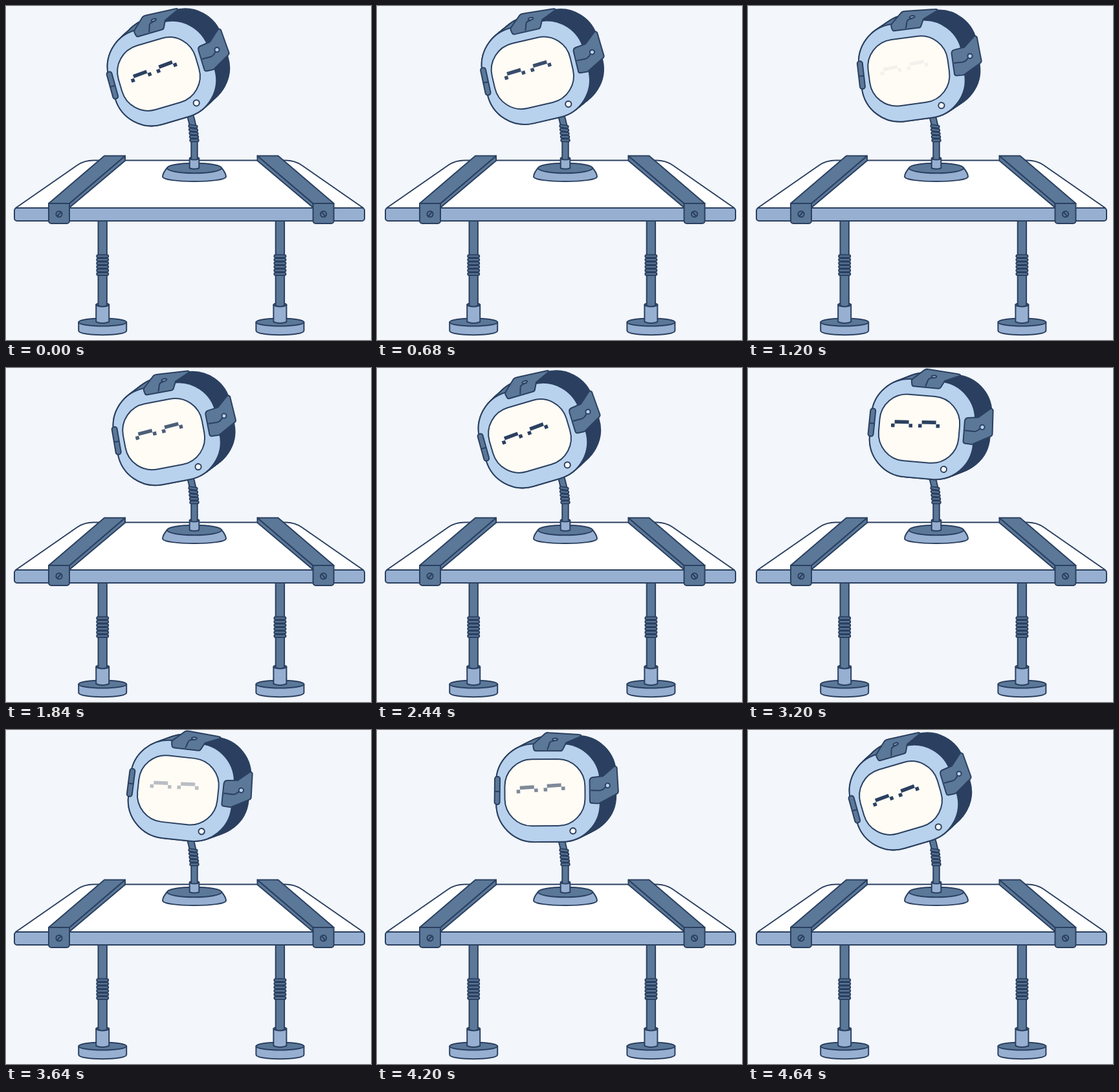
Animation of 564 by 516 pixels, one loop 4800 ms. Source, as an HTML page with a canvas:

```html
<!DOCTYPE html>
<html lang="en">
<head>
<meta charset="utf-8">
<title>Desk robot</title>
<style>
  html, body { margin: 0; width: 564px; height: 516px; overflow: hidden; background: #f3f6fb; }
  canvas { display: block; }
</style>
</head>
<body>
<canvas id="stage" width="564" height="516"></canvas>
<script>
const ctx = document.getElementById('stage').getContext('2d');
const LOOP = 4800, STEP = 40;
const BG = '#f3f6fb', LINE = '#2b4060', MID = '#5b7899', LIGHT = '#97b0d1',
      FACE = '#b8d2ee', GLASS = '#fffcf5', WHITE = '#ffffff';
const RAD = Math.PI / 180;

const clamp = v => Math.min(1, Math.max(0, v));
const ramp = (t, a, b) => clamp((t - a) / (b - a));
const ease = (t, a, b) => {
  const u = ramp(t, a, b);
  return u * u * u * (10 - 15 * u + 6 * u * u);
};

function paint(path, fill) {
  if (fill) { ctx.fillStyle = fill; ctx.fill(path); }
  ctx.lineWidth = 2;
  ctx.strokeStyle = LINE;
  ctx.stroke(path);
}
const draw = (d, fill) => paint(new Path2D(d), fill);

function box(x, y, w, h, r, fill) {
  const p = new Path2D();
  p.roundRect(x, y, w, h, r);
  paint(p, fill);
}

function oval(x, y, rx, ry, fill, tilt = 0) {
  const p = new Path2D();
  p.ellipse(x, y, rx, ry, tilt * RAD, 0, 7);
  paint(p, fill);
}

function at(x, y, deg, fn) {
  ctx.save();
  ctx.translate(x, y);
  ctx.rotate(deg * RAD);
  fn();
  ctx.restore();
}

function strap() {
  draw('M184 231.5V239L98 311.5V305Z', MID);
  draw('M66 305L152 231.5H184L98 305Z', MID);
  box(66, 305, 32, 31, [0, 0, 4, 4], MID);
  oval(82, 321.5, 4.6, 4.6, MID);
  draw('M79 325L85 318');
}

function leg(x) {
  at(x, 0, 0, () => {
    draw('M-37 488.5V501.5C-37 510.5 37 510.5 37 501.5V488.5Z', LIGHT);
    oval(0, 488.5, 37, 6, MID);
    draw('M-10 461.5V488Q0 492 10 488V461.5Z', LIGHT);
    oval(0, 461.5, 10, 2.5, MID);
    draw('M-6.7 332V463Q0 466 6.7 463V332Z', MID);
    for (let i = 0; i < 6; i++) box(-9, 384.5 + i * 5.5, 18, 4, 2, MID);
  });
}

function table() {
  leg(149.2);
  leg(423.4);
  draw('M15 312L110 246Q121 238.5 135 238.5H432Q446 238.5 457 246L552 312Z', WHITE);
  box(13, 312, 541, 20, 4, LIGHT);
  strap();
  ctx.save();
  ctx.translate(572.5, 0);
  ctx.scale(-1, 1);
  strap();
  ctx.restore();
}

function stand() {
  draw('M249 250C244 256 242 260 242 263.5C242 273.5 340 273.5 340 263.5C340 260 338 256 333 250Z', LIGHT);
  oval(291, 250.5, 42, 7.7, MID);
  draw('M283.7 235.5V250.5Q291 253 298.3 250.5V235.5Z', LIGHT);
  oval(291, 235.5, 7.3, 2, MID);
  const neck = new Path2D('M291 236V206Q290.5 186 283 164');
  for (const [w, c] of [[11.5, LINE], [7.5, MID]]) {
    ctx.lineWidth = w;
    ctx.strokeStyle = c;
    ctx.stroke(neck);
  }
  for (let i = 0; i < 5; i++) {
    at(289 + i * 0.5, 186 + i * 5.4, 8 - i * 2, () => box(-6.7, -2, 13.4, 4, 2, MID));
  }
}

const TILT = -16.5, CX = 236, CY = 105;

function shell(inset = 0) {
  const p = new Path2D();
  p.roundRect(-75.3 + inset, -75.3 + inset, 160.6 - 2 * inset, 151.6 - 2 * inset, 59 - inset);
  return p;
}

// sweeps the face outline backwards to make the casing
function casing(inset, color) {
  const path = shell(inset);
  for (let i = 0; i <= 24; i++) {
    const k = i / 24;
    at(CX + 20 * k, CY - 18.5 * k, TILT, () => {
      if (inset) { ctx.fillStyle = color; ctx.fill(path); }
      else paint(path, color);
    });
  }
}

function brackets() {
  draw('M211 17Q213 15 216 14.5L261 4.5Q267 3 264 7L246 22L244 33Q243.5 36 241 36.5L205 47Q202 48 200.500 45L198.500 41Q197.500 39 199 36.5Z', MID);
  draw('M228 24C218 28 223 30 221 40.5');
  oval(228.2, 21.8, 4, 1.8, LIGHT, -18);
  draw('M297.500 69Q296 64 300 62L315 55.500L327 37Q329 34 332 37L344.500 72Q345 74 343.500 75.500L322 97Q321 98 319 98.500L310 100.500Q307.500 101 306.500 98.500Z', MID);
  draw('M303 82L316 78.500Q321 77 323.500 70.500');
  oval(326, 67.5, 3.6, 3.6, FACE);
}

function eye(x) {
  const u = 5.5;
  ctx.fillRect(x - u / 2, -u / 2, u, u);
  ctx.fillRect(x + u / 2, -1.5 * u, 4 * u, u);
  ctx.fillRect(x + 4.5 * u, -u / 2, u, u);
}

function head(eyes) {
  casing(0, LINE);
  ctx.save();
  ctx.beginPath();
  ctx.rect(100, -20, 122, 120);
  ctx.clip();
  casing(1, MID);
  ctx.restore();

  at(CX, CY, TILT, () => {
    paint(shell(), FACE);
    box(-62, -51.5, 124, 103, 42, GLASS);
  });
  at(164.4, 122.5, TILT + 1, () => {
    box(-4, -21.5, 8, 43, 3.5, MID);
    draw('M-4 1.500H4');
  });
  oval(294.2, 149.8, 4.6, 4.6, WHITE);
  brackets();

  at(196.2, 115, -20.3, () => {
    ctx.globalAlpha = eyes;
    ctx.fillStyle = LINE;
    eye(0);
    eye(42);
  });
}

function pose(t) {
  const near = ease(t, 400, 1040) - ease(t, 1440, 2400);
  const far = ease(t, 2440, 3400) - ease(t, 3920, 4650);
  const bow = Math.sin(Math.PI * far);
  const shut = ramp(t, 640, 1200) - ramp(t, 1440, 1920)
             + ramp(t, 3240, 3800) - ramp(t, 3920, 4400);
  return {
    deg: 8.9 * near + 22.8 * far,
    dx: 1.3 * near * near + 3.4 * bow,
    dy: 1.6 * Math.sin(near * Math.PI / 2) + 1.9 * bow,
    eyes: 1 - 0.94 * shut
  };
}

function render(ms) {
  const p = pose(Math.floor((ms % LOOP) / STEP) * STEP);
  ctx.lineJoin = 'round';
  ctx.fillStyle = BG;
  ctx.fillRect(0, 0, 564, 516);
  table();
  stand();
  at(281 + p.dx, 173 + p.dy, p.deg, () => {
    ctx.translate(-281, -173);
    head(p.eyes);
  });
}

const start = performance.now();
function tick() {
  render(performance.now() - start);
  requestAnimationFrame(tick);
}
tick();
</script>
</body>
</html>
```
